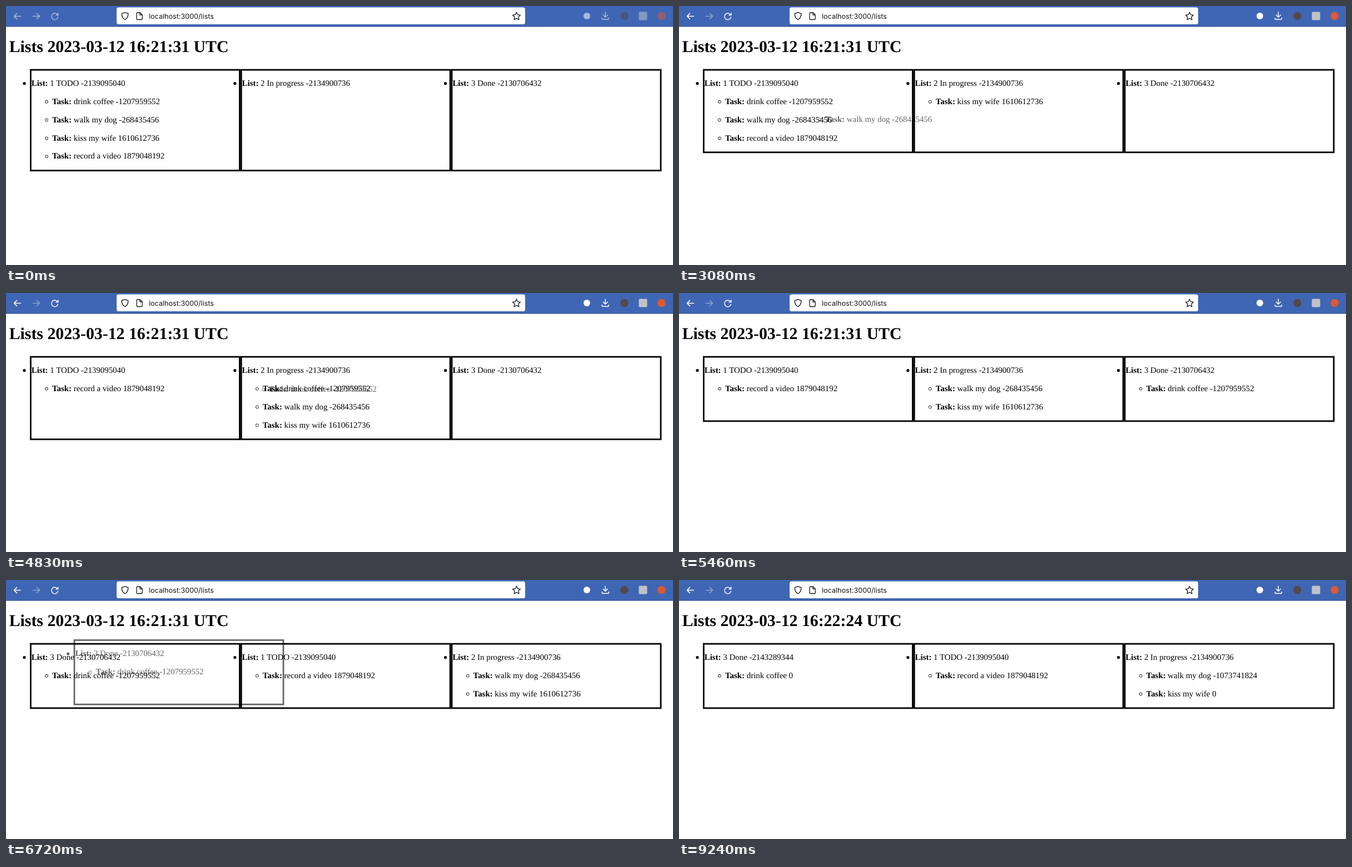
An HTML page that plays this animation: 1200x467 px, repeating every 9800 ms.

```html
<!DOCTYPE html>
<html lang="en">
<head>
<meta charset="utf-8">
<title>Task lists</title>
<style>
  html, body { margin: 0; width: 100%; height: 100%; overflow: hidden; background: #fff; }
  svg { display: block; width: 100vw; height: 100vh; }
  text { text-rendering: geometricPrecision; white-space: pre; }
  .page text { font: 14.9px "Liberation Serif", "Times New Roman", serif; }
  .page .title { font-size: 29.8px; font-weight: bold; }
  .bold { font-weight: bold; }
  .url { font: 12.6px Inter, Roboto, sans-serif; fill: #15141a; }
  .line { fill: none; stroke: #fff; stroke-width: 1.5; stroke-linecap: round; stroke-linejoin: round; }
  .dark { stroke: #15141a; stroke-width: 1.3; }
</style>
</head>
<body>
<svg viewBox="0 0 1200 467" preserveAspectRatio="none">
  <rect width="1200" height="37" fill="#3f66b4"/>
  <rect y="36.5" width="1200" height="1" fill="#2c4a88"/>
  <rect x="199" y="2.5" width="735" height="30.5" rx="3.5" fill="#fff"/>
  <path class="line dark" d="M214 11.6l5.8 2.1c0 5.3-1.5 8.6-5.8 11.1c-4.3-2.5-5.800-5.800-5.800-11.100z"/>
  <path class="line dark" d="M236.500 12h4.700l4 4v7a1.500 1.500 0 0 1-1.500 1.500h-7.200a1.500 1.500 0 0 1-1.500-1.500v-9.500a1.500 1.500 0 0 1 1.500-1.500zM241 12v4.200h4.200"/>
  <text class="url" x="257" y="22.700">localhost:3000/lists</text>
  <path id="star" class="line dark"/>
  <path id="forward" class="line" d="M48.500 18.400h12M55.500 13.400l5 5l-5 5"/>
  <rect id="hover" x="73" y="3" width="30" height="30" rx="3.500" fill="#fff"/>
  <g id="reload">
    <path class="line" d="M92.600 15.600A5.800 5.800 0 1 0 93.500 20.200"/>
    <path d="M94.500 11.700v5.600h-5.600z" fill="#fff"/>
  </g>
  <path id="stop" class="line" d="M83 13.500l10 10M93 13.500l-10 10"/>
  <g id="controls">
    <path class="line" d="M26.500 18.400h-12M19.500 13.400l-5 5l5 5"/>
    <circle cx="1045" cy="18" r="6" fill="#fff"/>
    <path class="line" d="M1078.300 11v9M1074.300 16.300l4 4l4-4M1072.300 21.500v1.300a1.500 1.500 0 0 0 1.500 1.500h9a1.500 1.500 0 0 0 1.500-1.500v-1.300"/>
    <circle cx="1112.500" cy="18" r="7.300" fill="#54484a"/>
    <rect x="1138.500" y="10.500" width="15" height="15" rx="2" fill="#bfc2c8"/>
    <circle cx="1179.500" cy="18" r="7.300" fill="#de5833"/>
  </g>
  <g class="page">
    <text id="title" class="title" x="5.700" y="82.700"></text>
    <g id="board"></g>
    <g id="ghost" opacity="0.6"></g>
  </g>
</svg>
<script>
const LOOP = 9800, STEP = 70;
const LEFT = 43, TOP = 113.7, COLUMN = 378.8, ROW = 32.85, BORDER = 2.8;
const ACTIVE = 490, RELOADED = 8400;

const lists = {
  1: ['1 TODO -2139095040'],
  2: ['2 In progress -2134900736'],
  3: ['3 Done -2130706432', '3 Done -2143289344']
};
const tasks = {
  c: ['drink coffee -1207959552', 'drink coffee 0'],
  d: ['walk my dog -268435456', 'walk my dog -1073741824'],
  k: ['kiss my wife 1610612736', 'kiss my wife 0'],
  r: ['record a video 1879048192']
};

// Each word is a column: list number, then its tasks from top to bottom.
const layouts = [
  [0, '1cdkr 2 3'],
  [2030, '1cdr 2k 3'],
  [3290, '1cr 2dk 3'],
  [4830, '1r 2cdk 3'],
  [5250, '1r 2dk 3c'],
  [6440, '1r 3c 2dk'],
  [6580, '3c 1r 2dk']
];

// Path points: step, dx, dy.
const drags = [
  { start: 1330, end: 2170, task: 'k', row: 3,
    path: [[0, 25, 0], [2, 130, -3], [5, 328, -17], [7, 378, -42], [10, 400, -83], [11, 400, -83]] },
  { start: 3080, end: 3780, task: 'd', row: 2,
    path: [[0, 180, -1], [2, 315, -10], [4, 372, -26], [7, 392, -39], [9, 393, -39]] },
  { start: 4620, end: 5460, task: 'c', row: 1,
    path: [[0, 30, 0], [2, 250, 2], [4, 530, 0], [6, 760, -6], [8, 890, -16], [10, 926, -22.5], [11, 926, -22.5]] },
  { start: 6370, end: 6930, column: '3c', index: 2,
    path: [[0, -47, -2], [2, -290, -9], [4, -610, -8], [5, -679, -6.7], [7, -708, -6]] }
];

const $ = id => document.getElementById(id);
const between = (t, a, b) => t >= a && t < b;
const columnX = index => LEFT + index * COLUMN;
const pick = (versions, fresh) => versions[fresh ? versions.length - 1 : 0];

function label(kind, value, x, y) {
  return `<text x="${x}" y="${y}"><tspan class="bold">${kind}:</tspan> ${value}</text>`;
}

function taskItem(key, x, row, fresh) {
  const y = TOP + 30.3 + row * ROW;
  return `<circle cx="${x + 30}" cy="${y - 4.1}" r="2.5" fill="none" stroke="#000" stroke-width=".9"/>` +
    label('Task', pick(tasks[key], fresh), x + 40, y);
}

function column(code, x, rows, fresh) {
  const [id, ...keys] = code;
  const height = 53 + rows * ROW;
  const half = BORDER / 2;
  return `<rect x="${x + half}" y="${TOP + half}" width="${COLUMN - BORDER}" height="${height - BORDER}"
      fill="none" stroke="#000" stroke-width="${BORDER}"/>` +
    `<circle cx="${x - 10}" cy="${TOP + 26}" r="2.6"/>` +
    label('List', pick(lists[id], fresh), x + BORDER, TOP + 30.3) +
    keys.map((key, i) => taskItem(key, x, i + 1, fresh)).join('');
}

function along(path, step) {
  const i = Math.max(1, path.findIndex(p => p[0] >= step));
  const [a, b] = [path[i - 1], path[i]];
  const k = (step - a[0]) / (b[0] - a[0]);
  return [a[1] + (b[1] - a[1]) * k, a[2] + (b[2] - a[2]) * k];
}

function drawGhost(t) {
  const drag = drags.find(d => between(t, d.start, d.end));
  if (!drag) return $('ghost').replaceChildren();
  const [dx, dy] = along(drag.path, (t - drag.start) / STEP);
  $('ghost').setAttribute('transform', `translate(${dx} ${dy})`);
  $('ghost').innerHTML = drag.task
    ? taskItem(drag.task, LEFT, drag.row)
    : column(drag.column, columnX(drag.index), 2);
}

function drawToolbar(t) {
  const active = t >= ACTIVE;
  const stopping = between(t, 8260, 8540);
  const cooling = between(t, 8540, 9240);
  $('controls').setAttribute('opacity', active ? 1 : 0.55);
  $('forward').setAttribute('opacity', active ? 0.4 : 0.5);
  $('reload').setAttribute('opacity', stopping ? 0 : !active ? 0.55 : cooling ? 0.4 : 1);
  $('stop').setAttribute('opacity', stopping ? 1 : 0);
  const pressed = between(t, 8190, 8260);
  $('hover').setAttribute('opacity', pressed ? 0.3 : between(t, 7980, 8540) ? 0.17 : 0);
}

function render(t) {
  const fresh = t >= RELOADED;
  const codes = layouts.findLast(([time]) => t >= time)[1].split(' ');
  const rows = Math.max(...codes.map(code => code.length - 1));
  $('title').textContent = `Lists 2023-03-12 ${fresh ? '16:22:24' : '16:21:31'} UTC`;
  $('board').innerHTML = codes.map((code, i) => column(code, columnX(i), rows, fresh)).join('');
  drawGhost(t);
  drawToolbar(t);
}

const starPoints = Array.from({ length: 10 }, (_, i) => {
  const r = i % 2 ? 3.6 : 7.4, a = i * Math.PI / 5;
  return `${918.5 + r * Math.sin(a)} ${18.6 - r * Math.cos(a)}`;
});
$('star').setAttribute('d', `M${starPoints.join('L')}Z`);

const origin = performance.now();
let shown = -1;
function tick() {
  const step = Math.floor((performance.now() - origin) % LOOP / STEP);
  if (step !== shown) render((shown = step) * STEP);
  requestAnimationFrame(tick);
}
tick();
</script>
</body>
</html>
```
